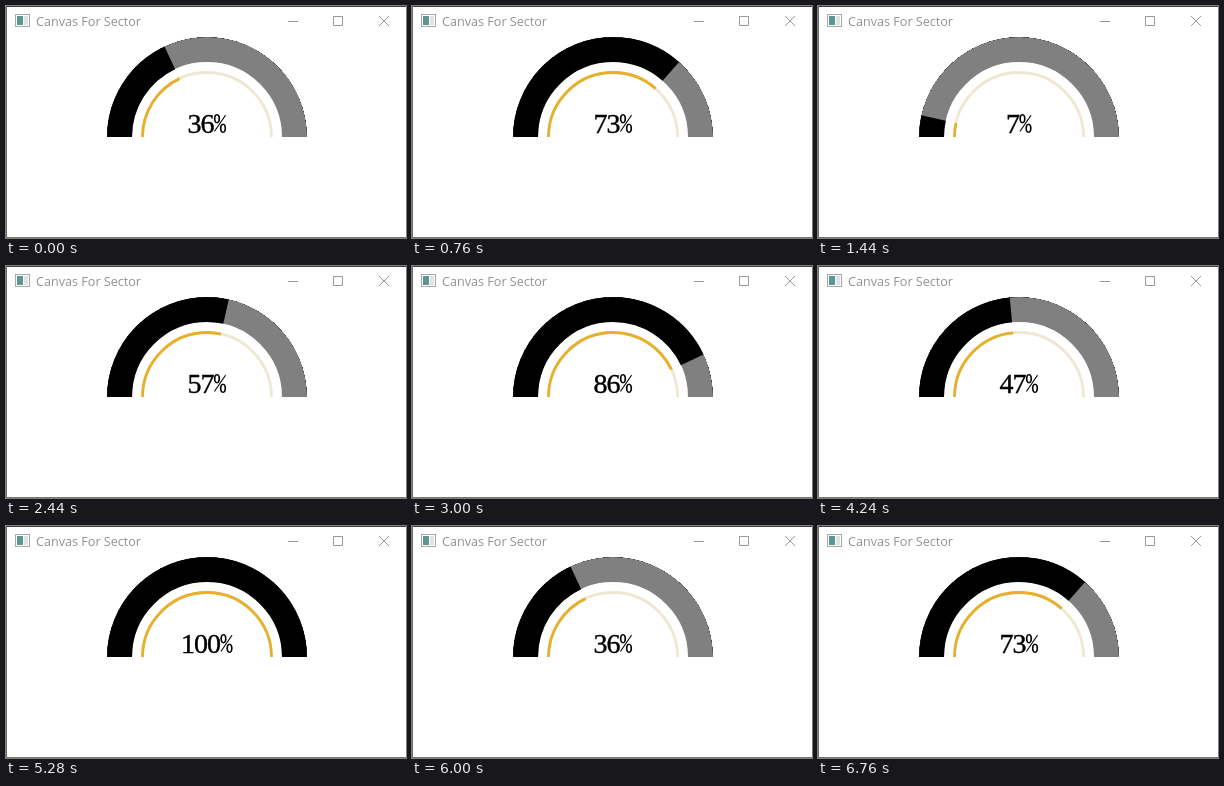
An HTML page for the animation above (6800 ms loop, 400 by 232 pixels).

```html
<!DOCTYPE html>
<html lang="en">
<head>
<meta charset="utf-8">
<title>Canvas For Sector</title>
<style>
  html, body { margin: 0; width: 100%; height: 100%; overflow: hidden; background: #fff; }
  svg { display: block; width: 400px; height: 232px; }
  .title { font: 12.6px "Open Sans", "Noto Sans", sans-serif; fill: #929292; }
  .controls { fill: none; stroke: #999; }
  .arc { fill: none; }
  .sector { stroke-width: 25; }
  .ring { stroke-width: 2.8; }
  .value { font: 28px "Liberation Serif", serif; letter-spacing: -1px; text-anchor: middle; stroke: #000; stroke-width: .4; }
  .unit { font: 26px "Noto Sans Mono CJK SC", "Noto Sans Mono CJK JP", "Noto Sans Mono", monospace; letter-spacing: 0; stroke-width: 0; }
</style>
</head>
<body>
<svg viewBox="0 0 400 232">
  <rect width="400" height="232" fill="#fff"/>

  <!-- window frame -->
  <g shape-rendering="crispEdges">
    <rect width="400" height="1" fill="#39443f"/>
    <rect width="1" height="232" fill="#6b706b"/>
    <rect y="231" width="400" height="1" fill="#77776a"/>
  </g>

  <!-- title bar -->
  <g shape-rendering="crispEdges">
    <rect x="9.5" y="8.5" width="14" height="12" fill="#fff" stroke="#a8a8a8"/>
    <rect x="11" y="10" width="6" height="9" fill="#5b9694"/>
    <rect x="18" y="10" width="4" height="9" fill="#dfe3e6"/>
  </g>
  <text class="title" x="30" y="20">Canvas For Sector</text>
  <path class="controls" d="M282 15.5h10M327.5 10.5h9v9h-9zM373 10l10 10M383 10l-10 10"/>

  <!-- gauge: a hard black rim shows behind the smooth sectors -->
  <path d="M101 131a100 100 0 0 1 200 0z" shape-rendering="crispEdges"/>
  <path d="M126 131a75 75 0 0 1 150 0z" fill="#fff" stroke="#fff" stroke-width="2"/>
  <path class="arc sector" d="M113.5 131a87.5 87.5 0 0 1 175 0" stroke="#808080"/>
  <path class="arc sector fill" d="M113.5 131a87.5 87.5 0 0 1 175 0" stroke="#000" pathLength="100"/>
  <path class="arc ring" d="M136.5 131a64.5 64.5 0 0 1 129 0" stroke="#eee8d2"/>
  <path class="arc ring fill" d="M136.5 131a64.5 64.5 0 0 1 129 0" stroke="#e7b02c" pathLength="100"/>
  <text class="value" x="201" y="127"><tspan id="number">36</tspan><tspan class="unit">%</tspan></text>
</svg>
<script>
  const LOOP = 6800, STEP = 40;
  // [step, running total]; the gauge restarts after each 100
  const pace = [[0, 36], [36, 107], [61, 157], [87, 210], [106, 247], [132, 300], [169, 373]];
  const fills = document.querySelectorAll('.fill');
  const number = document.getElementById('number');

  function percentAt(step) {
    const i = pace.findIndex(([s]) => s >= step) || 1;
    const [s0, v0] = pace[i - 1], [s1, v1] = pace[i];
    const total = Math.round(v0 + (v1 - v0) * (step - s0) / (s1 - s0));
    return (total - 1) % 100 + 1;
  }

  function draw() {
    const percent = percentAt(Math.floor(performance.now() % LOOP / STEP));
    number.textContent = percent;
    fills.forEach(arc => arc.setAttribute('stroke-dasharray', `${percent} 200`));
    requestAnimationFrame(draw);
  }
  draw();
</script>
</body>
</html>
```
